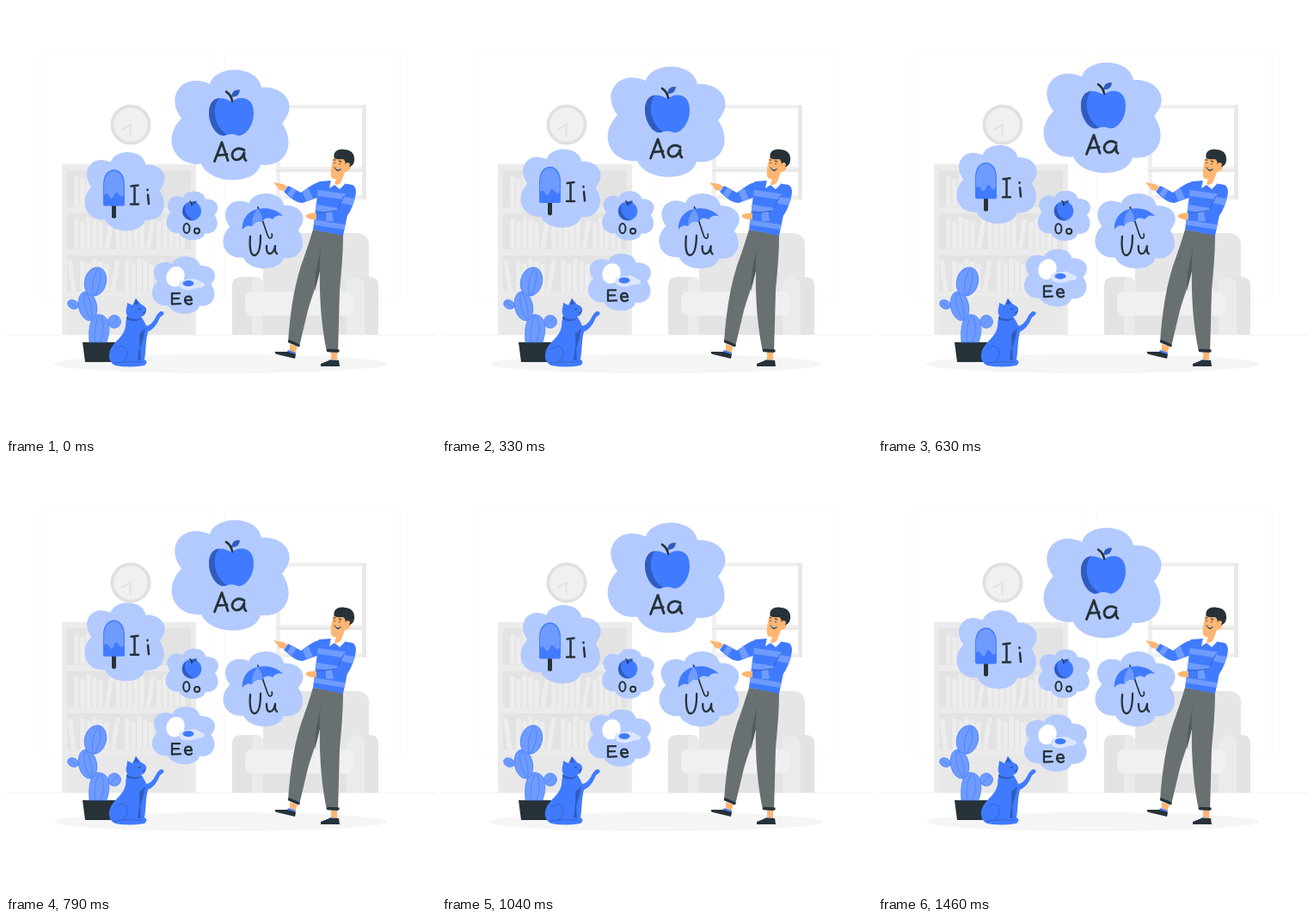
These frames come from a looping animation (500x500 px, 1500 ms). An HTML page:

```html
<!DOCTYPE html>
<html lang="en">
<head>
<meta charset="utf-8">
<title>Learning vowels</title>
<style>
html, body { margin: 0; width: 100%; height: 100%; overflow: hidden; background: #fff; }
svg { display: block; width: 100vw; height: 100vh; }
.ink { fill: none; stroke: #263238; stroke-linecap: round; stroke-linejoin: round; }
.blue { fill: #407bff; }
.deep { fill: #305cbf; }
.soft { fill: #6f9bff; }
.pale { fill: #b3caff; }
.dark { fill: #263238; }
.skin { fill: #ffb573; }
</style>
</head>
<body>
<svg viewBox="0 0 500 500">
  <defs>
    <path id="cloud" class="pale" d="M237 90C243 68 292 67 297 94C321 92 342 112 321 136C338 160 325 188 296 184C290 208 238 208 227 183C199 187 179 156 204 130C184 104 206 76 237 90Z"/>
    <clipPath id="torso"><path d="M364 204L378 203Q384 211 391 206L403 208Q408 211 406 218L397 243L392 267L357 260Z"/></clipPath>
  </defs>

  <!-- Room -->
  <g fill="none" stroke="#fafafa">
    <path d="M39.500 55.500H242.500V337.500H39.500ZM254.500 55.500H458.500V337.500H254.500Z"/>
    <path stroke="#f3f3f3" d="M0 382.500H500"/>
  </g>
  <ellipse cx="249.500" cy="416" rx="193.500" ry="11" fill="#f5f5f5"/>
  <circle cx="145" cy="138" r="23.500" fill="#e0e0e0"/>
  <circle cx="145" cy="138" r="19.800" fill="#f0f0f0"/>
  <path d="M144.500 152V138L134 144" fill="none" stroke="#e0e0e0" stroke-width="1.600"/>
  <path d="M65 184H221V382H65Z" fill="#ebebeb"/>
  <path d="M71 191H215V234H71ZM71 241H215V283H71ZM71 290H215V332H71Z" fill="#e3e3e3"/>
  <path d="M71 338H215V382H71Z" fill="#e8e8e8"/>
  <g id="books" fill="#ededed"></g>
  <path d="M314 115H419V225H314Z" fill="#f0f0f0"/>
  <path d="M414 115H419V225H414ZM314 190H414V193H314Z" fill="#e8e8e8"/>
  <path d="M319 119H414V187H319ZM319 193H414V220H319Z" fill="#fff"/>
  <rect x="299" y="264" width="123" height="110" rx="13" fill="#e6e6e6"/>
  <path d="M263 382V325Q263 315 274 315H289Q299 315 299 325V360H397V325Q397 315 407 315H423Q433 315 433 325V382Z" fill="#e3e3e3"/>
  <path d="M286 382V325Q286 315 293 315Q299 317 299 325V382ZM396 382V325Q398 315 407 315Q417 316 417 327V382Z" fill="#ebebeb"/>
  <rect x="278" y="332" width="126" height="28" rx="8" fill="#f0f0f0"/>

  <!-- Cactus -->
  <path class="dark" d="M89 391H127L123 414H92Z"/>
  <g class="soft" stroke="#407bff" stroke-width=".7">
    <ellipse cx="126" cy="367" rx="7.500" ry="7.500"/>
    <ellipse cx="78" cy="347" rx="6.500" ry="5" transform="rotate(25 78 347)"/>
    <path d="M97 391C95 366 102 357 110 359C121 361 122 377 117 391Z"/>
    <ellipse cx="95" cy="349" rx="10.500" ry="17" transform="rotate(-12 95 349)"/>
    <ellipse cx="104" cy="320.500" rx="12.500" ry="17" transform="rotate(15 104 320.500)"/>
    <path fill="none" d="M107 306Q98 320 101 336M109 306Q112 322 103 337M91 334Q89 350 98 364M93 333Q101 347 100 364M108 360Q101 375 104 390M111 361Q116 376 110 390M130 362L121 372M74 344L82 350"/>
  </g>

  <!-- Bubbles -->
  <g id="bubbleA" aria-label="Aa">
    <use href="#cloud"/>
    <path class="blue" d="M262 111C270 104 288 103 288 124C288 140 277 152 269 150C265 148 259 148 255 150C246 153 236 138 236 124C236 104 252 104 262 111Z"/>
    <path class="deep" d="M248 106.500C238 118 243 141 257 149C247 154 236 138 236 124C236 112 242 107 248 106.500Z"/>
    <path class="deep" d="M262 105Q263 96 272 97Q271 106 262 105Z"/>
    <path class="ink" stroke-width="2.600" d="M256 99Q262 103 263 110"/>
    <path class="ink" stroke-width="2.900" d="M242.500 180L251 158L258 179M246 173L257 172M277 167C269 162 263 168 263 173C264 180 273 181 277 170Q276 177 279 179"/>
  </g>
  <g id="bubbleI" aria-label="Ii">
    <use href="#cloud" transform="translate(-39.500 117) scale(.68 .713)"/>
    <path class="dark" d="M123 230H128V245Q125.500 248 123 245Z"/>
    <path class="blue" d="M113 230V207C113 184 138 184 138 207V230Q138 232 135 232H116Q113 232 113 230Z"/>
    <path class="soft" d="M114 219V207C115 186 136 186 137 207V219Q134 224 131 218Q127 213 125 221Q122 226 119 219Q117 216 114 219Z"/>
    <path class="ink" stroke-width="2.500" d="M145.500 209L153.500 208M149.500 209V229.500M145 230L154 230M165 219L166 229.500M164.500 213V213.500"/>
  </g>
  <g id="bubbleO" aria-label="Oo">
    <use href="#cloud" transform="translate(102.500 183) scale(.436 .442)"/>
    <circle class="blue" cx="216" cy="238.500" r="11"/>
    <path class="deep" d="M209 230C206 238 211 246 219 249C207 251 201 238 209 230Z"/>
    <path class="deep" d="M215 231Q216 226 222 227Q221 232 215 231Z"/>
    <path class="ink" stroke-width="1.400" d="M214 227Q216 229 216 232"/>
    <g class="ink" stroke-width="2"><ellipse cx="210" cy="258.500" rx="3.500" ry="5.500"/><circle cx="222" cy="261.500" r="3"/></g>
  </g>
  <g id="bubbleE" aria-label="Ee">
    <use href="#cloud" transform="translate(67 252.500) scale(.534 .519)"/>
    <ellipse cx="197" cy="314" rx="10.500" ry="12" fill="#fff" transform="rotate(25 197 314)"/>
    <path d="M201 323C200 317 209 318 215 317C222 315 224 320 229 321C234 324 229 328 223 327C215 331 202 331 201 323Z" fill="#dce6ff"/>
    <ellipse class="blue" cx="212" cy="322" rx="6.500" ry="3.500"/>
    <path class="ink" stroke-width="2.300" d="M202 333.500H193V346L203 345.500M194 339.500H201M208 341.500H216C215 335 208 336 208 342C209 347 214 347 216 345"/>
  </g>
  <g id="bubbleU" aria-label="Uu">
    <use href="#cloud" transform="translate(121.500 168) scale(.68 .68)"/>
    <path class="ink" stroke-width="1.700" d="M293 234L304 266Q306 272 309 269Q310 267 309 265"/>
    <path class="blue" d="M293 236C281 238 274 249 275 260Q279 254 286 256Q291 249 298 251Q302 244 310 248Q314 242 322 244C314 236 303 234 293 236Z"/>
    <path class="soft" d="M293 236C288 241 286 248 286 256Q291 249 298 251Q298 242 293 236Z"/>
    <path class="ink" stroke-width="2.300" d="M284 268C283 280 284 290 289 290C295 289 296 278 296 267M303 279C302 292 311 290 313 279Q312 286 315 288"/>
  </g>

  <!-- Cat -->
  <path class="blue" d="M141 345L147 348L151 340L157 347C162 349 165 352 162 357Q161 361 157 361C160 365 162 369 163 372Q169 371 173 364Q176 357 180 355Q185 355 183 359L179 362Q174 375 165 379C162 390 163 401 161 411Q166 414 161 418Q143 421 127 418C118 414 118 403 124 395C130 387 137 383 139 373Q139 367 141 360C138 355 141 351 141 345Z"/>
  <path class="deep" d="M149 347L151 340L154 347ZM140 361Q149 367 158 362Q151 370 140 364ZM162 375Q160 387 156 398L157 412L153 411Q156 394 155 381Z"/>
  <path d="M154 353L157 352M159 357Q161 358 162 355" fill="none" stroke="#263238" stroke-width=".8"/>
  <path d="M125 415Q143 413 158 414M127 399Q139 390 141 403Q141 411 135 414" fill="none" stroke="#305cbf" stroke-width=".8"/>

  <!-- Teacher -->
  <path class="skin" d="M330 393L339 396L336 404L330 402ZM378 401L385 402V414H378Z"/>
  <path class="blue" d="M328 400L337 403L336 407L326 404ZM376 411L386 412V416H374Z"/>
  <path class="dark" d="M313 402L327 402L337 405L336 410L315 405Q312 404 313 402ZM366 416L376 412L387 412L388 419H366Z"/>
  <path fill="#687072" d="M357 260L392 266C392 287 390 309 388 330L386 403L373 402C368 378 364 346 365 306C361 325 355 340 351 354L341 396L328 391C330 362 334 330 343 302Q350 283 357 260Z"/>
  <path fill="#535b5e" d="M367 281Q364 294 365 308L359 332Q359 304 367 281Z"/>
  <path class="ink" stroke-width="3.500" d="M329.500 390L340 394.500M374.500 400.500L386 401"/>
  <path class="blue" d="M367 204C356 206 351 212 343 217L328 209L323 216Q337 230 345 229L364 222Z"/>
  <path class="soft" d="M332 211L327 219L332 223L338 214ZM351 211L345 216L349 227L357 224Z"/>
  <path class="skin" d="M327 210C322 205 316 207 312 205Q312 208 316 210Q315 214 323 215Z"/>
  <g clip-path="url(#torso)">
    <path class="blue" d="M350 198H412V270H350Z"/>
    <path class="soft" d="M350 212L412 221V228L350 219ZM350 229L412 239V246L350 236ZM350 247L412 257V263L350 253Z"/>
  </g>
  <path class="blue" d="M397 215Q410 207 406 222C403 236 396 248 390 249Q374 251 361 248V241L384 238Z"/>
  <path class="soft" d="M393 222L406 224L403 232L389 229ZM372 240L379 239L381 250L372 250Z"/>
  <path d="M386 235L393 221M362 241L384 238" fill="none" stroke="#305cbf" stroke-width=".8"/>
  <path class="skin" d="M361 241Q352 240 348 244Q351 249 361 248Z"/>
  <path fill="#fff" d="M378 202L376 212L382 208L388 213L394 207L390 201Z"/>
  <path class="skin" d="M381 175C379 184 376 195 379 200Q382 202 384 201L382 207Q386 210 390 204L394 193Q402 192 401 184L396 176Z"/>
  <path class="dark" d="M382 177C379 169 388 165 394 167C401 167 406 172 405 180Q404 186 399 187L394 185Q396 181 392 178Q386 179 382 177Z"/>
  <path class="skin" d="M394 184Q398 180 400 184Q399 189 394 189Z"/>
  <path class="dark" d="M381 187Q385 190 390 189Q386 196 381 187Z"/>
  <path fill="#fff" d="M382 188Q385 190 389 189.500Q385 192 382 188Z"/>
  <path class="ink" stroke-width="1" d="M382 182V183M388 183V184M381 179L383 179M387 180L390 181"/>
</svg>
<script>
const LOOP = 1500;
const byId = id => document.getElementById(id);

function book(x, bottom, height, lean = 0) {
  return `<path stroke="#e3e3e3" stroke-width=".6" d="M${x} ${bottom}h6l${lean} ${-height}h-6z"/>`;
}

function row(from, to, bottom, seed) {
  let out = '';
  for (let x = from, i = seed; x < to; x += 7, i++) {
    const lean = i % 6 === 0 ? 6 : 0;
    out += book(x, bottom, 31 + (i * 5) % 8, lean);
    if (lean) x += 6;
  }
  return out;
}

byId('books').innerHTML =
  row(79, 118, 234, 1) + row(79, 207, 283, 1) +
  book(76, 332, 36, -5) + row(86, 132, 332, 1) + row(138, 207, 332, 1);

function draw(now) {
  const phase = now % LOOP / LOOP * 2 * Math.PI;
  const rise = (1 - Math.cos(phase)) / 2;
  for (const name of 'AIE') {
    byId('bubble' + name).setAttribute('transform', `translate(0 ${.6 - 9 * rise})`);
  }
  byId('bubbleO').setAttribute('transform', `translate(216.500 244) scale(${1 + .03 * rise}) translate(-216.500 -244)`);
  byId('bubbleU').setAttribute('transform', `rotate(${Math.sin(phase)} 300 262)`);
}

const start = performance.now();
function tick() {
  draw(performance.now() - start);
  requestAnimationFrame(tick);
}
tick();
</script>
</body>
</html>
```
